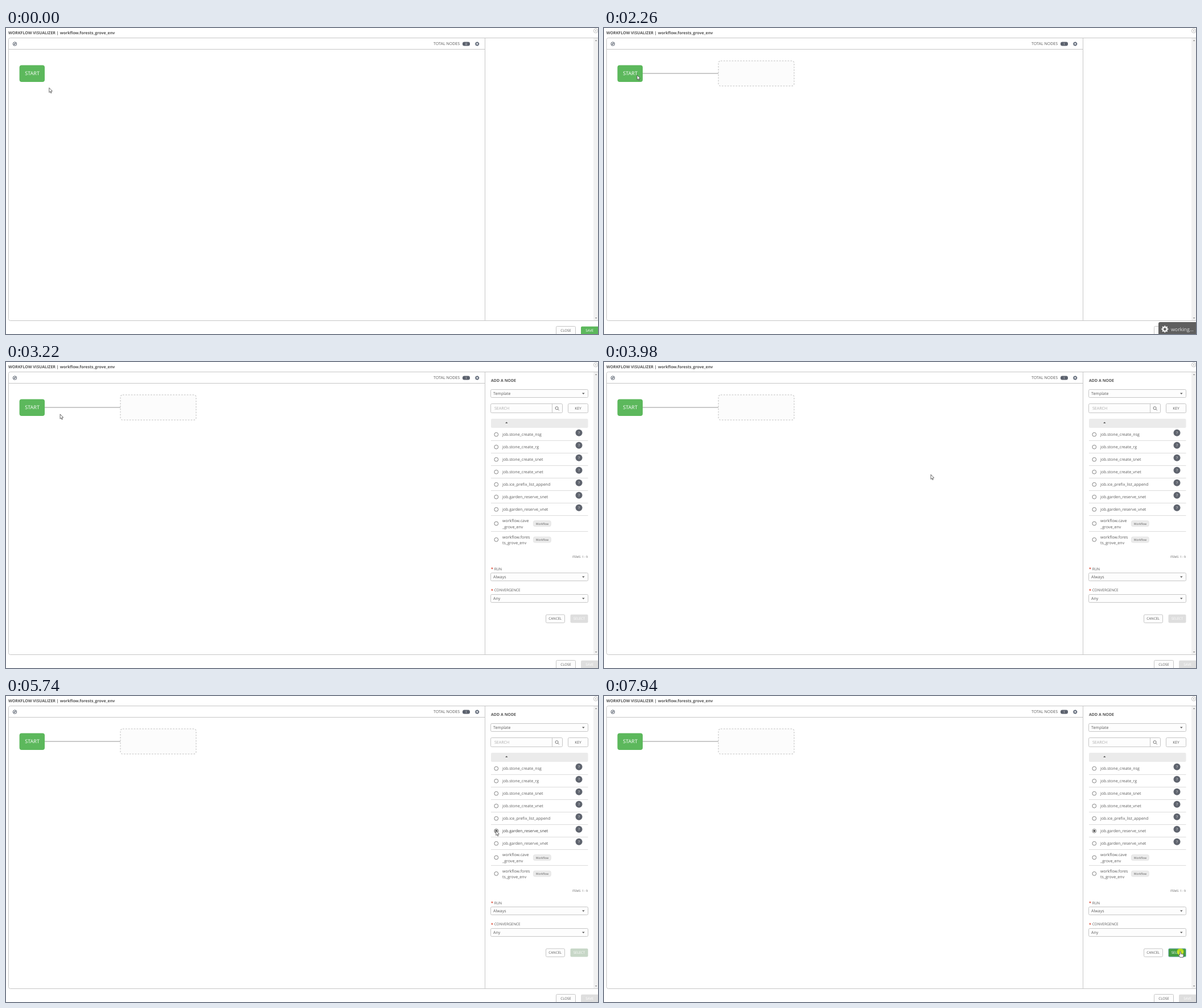
These frames come from a looping animation (1040x539 px, 8000 ms). An HTML page:

```html
<!DOCTYPE html>
<html lang="en">
<head>
<meta charset="utf-8">
<title>Workflow visualizer</title>
<style>
  html, body { margin: 0; width: 100%; height: 100%; overflow: hidden; background: #fff; }
  svg { display: block; width: 100%; height: 100%; }
  text { font-family: "Open Sans", "Noto Sans", sans-serif; font-size: 7.05px; fill: #5a5a5a; text-rendering: geometricPrecision; }
  .bold { font-weight: 700; font-size: 7px; fill: #555; }
  .btn { font-size: 6.1px; text-anchor: middle; }
  .label { font-size: 6.45px; }
  .star { fill: #d9432f; font-weight: 700; }
  .tiny { font-size: 5.1px; }
  .mid { text-anchor: middle; }
  .end { text-anchor: end; }
  .white { fill: #fff; }
  .box { fill: #fdfdfd; stroke: #c6c6c6; stroke-width: 1; }
  .line { fill: none; stroke: #c6c6c6; stroke-width: 1; }
  .row { stroke: #dcdcdc; stroke-width: 1; }
  .ring { fill: #fff; stroke: #757575; stroke-width: .9; }
  .caret { fill: #555; }
</style>
</head>
<body>
<svg id="stage" viewBox="0 0 1040 539" preserveAspectRatio="xMinYMin meet"></svg>
<script>
const LOOP = 8000;
const GREEN = [92, 184, 92], GREY = [222, 222, 222];

// ---- markup helpers ----
const text = (x, y, s, cls = '', attrs = '') => `<text x="${x}" y="${y}" class="${cls}" ${attrs}>${s}</text>`;
const rect = (x, y, w, h, rx, attrs) => `<rect x="${x}" y="${y}" width="${w}" height="${h}" rx="${rx}" ${attrs}/>`;
const box = (x, y, w, h) => rect(x, y, w, h, 2, 'class="box"');
const caret = (x, y, w, h) => `<path class="caret" d="M${x - w} ${y}h${2 * w}l${-w} ${h}z"/>`;
const dropdown = (y, s) => box(851.5, y, 171, 14) + text(856, y + 9.6, s) + caret(1014.3, y + 6, 2.3, 2.6);

function gear(r, fill) {
  const pts = [];
  for (let i = 0; i < 32; i++) {
    const a = (i - .5) * Math.PI / 16;
    const d = i % 4 < 2 ? r : r * .76;
    pts.push((d * Math.sin(a)).toFixed(2) + ' ' + (-d * Math.cos(a)).toFixed(2));
  }
  const h = r * .36;
  return `<path fill="${fill}" fill-rule="evenodd" d="M${pts.join('L')}ZM${-h} 0a${h} ${h} 0 1 0 ${2 * h} 0a${h} ${h} 0 1 0 ${-2 * h} 0z"/>`;
}

// ---- scene parts ----
function frame() {
  return text(4, 11.4, 'WORKFLOW VISUALIZER |', 'bold') +
    text(94.7, 11.4, 'workflow.forests_grove_env', 'bold') +
    `<g fill="none" stroke="#c6c6c6"><circle cx="1036" cy="5" r="3.7"/><path d="M1034.5 3.5l3 3m0-3l-3 3"/></g>` +
    rect(1032, 18, 8, 497, 0, 'fill="#f1f1f1"') +
    `<path fill="#8a8a8a" d="M1034.8 23h3.6l-1.8-2zM1034.8 510h3.6l-1.8 2z"/>` +
    `<path class="line" d="M1040 17.5H7.5a3 3 0 0 0-3 3V512.5a3 3 0 0 0 3 3H1040M4.5 37.5H841.5M841.5 17.5V515.5"/>` +
    `<g transform="translate(15.5 28)"><circle r="3.2" fill="none" stroke="#4f5866"/><path fill="#4f5866" d="M2-2L.8.8-2 2-.8-.8z"/></g>` +
    text(751, 30.3, 'TOTAL NODES') +
    rect(802, 24.6, 13, 6.8, 3, 'fill="#5c626e"') +
    text(808.5, 29.9, '0', 'tiny mid white', 'id="count"') +
    `<g transform="translate(827.7 28)">${gear(3.9, '#566070')}</g>`;
}

function graph() {
  return `<g id="node"><path d="M68 80H201" stroke="#b7b7b7" stroke-width="1.5"/>` +
    rect(201, 57.8, 133, 44.4, 4, 'fill="#fcfcfc" stroke="#cdcdcd" stroke-width="1.3" stroke-dasharray="2.7 2.2"') + '</g>' +
    rect(23.6, 65.4, 44.4, 29.5, 4, 'fill="#5cb85c"') +
    text(46.1, 83.3, 'START', 'mid white', 'style="font-size:9px"');
}

function form() {
  const jobs = ['stone_create_nsg', 'stone_create_rg', 'stone_create_snet', 'stone_create_vnet',
    'ice_prefix_list_append', 'garden_reserve_snet', 'garden_reserve_vnet'];
  const flows = [['workflow.cave', '_grove_env'], ['workflow.fores', 'ts_grove_env']];
  const ring = (y, id = '') => `<circle class="ring" cx="861.3" cy="${y}" r="3.4" ${id}/>`;
  const rule = y => `<path class="row" d="M852 ${y}H1022.5"/>`;

  let s = text(852, 35.4, 'ADD A NODE', 'bold') + dropdown(48.5, 'Template');
  s += box(851.5, 73.5, 126, 16) + `<path class="line" d="M959.5 73.5v16"/>` +
    text(858, 84.1, 'SEARCH', '', 'style="fill:#adadad"') +
    `<g fill="none" stroke="#666" stroke-width=".9"><circle cx="967.6" cy="81.2" r="2.5"/><path d="M969.5 83.1l2.2 2.2"/></g>` +
    box(987.5, 73.5, 35, 16) + text(1005, 83.9, 'KEY', 'btn', 'style="font-size:6.6px"');
  s += rect(852, 100, 170.5, 16, 2, 'fill="#ebebeb"') + caret(879.3, 108, 2.2, -2.4);

  jobs.forEach((job, i) => {
    const y = 127.7 + 22 * i, hot = i === 5;
    s += ring(y, hot ? 'id="radio"' : '') +
      text(872, (y + 2.4).toFixed(1), 'job.' + job, '', hot ? 'id="pick"' : '') +
      `<circle cx="1006.5" cy="${y - 3}" r="6" fill="#5f646e"/>` +
      text(1006.5, (y - .8).toFixed(1), '?', 'btn white') + rule(138.5 + 22 * i);
  });
  s += `<circle id="dot" cx="861.3" cy="237.7" r="1.9" fill="#4a4a4a"/>`;

  flows.forEach(([top, bottom], i) => {
    const y = 284.5 + 28.4 * i;
    s += ring(y) + text(872, y - 2.4, top) + text(872, y + 8, bottom) +
      rect(926.4, y - 5, 31, 10.2, 3, 'fill="#ebebeb" stroke="#dedede" stroke-width=".6"') +
      text(942, y + 2, 'Workflow', 'tiny mid');
  });
  s += rule(298.5) + text(1022, 345, 'ITEMS&#160; 1 - 9', 'tiny end');

  s += text(852, 367, '*', 'star') + text(857.7, 366.6, 'RUN', 'label') + dropdown(371.5, 'Always');
  s += text(852, 404.8, '*', 'star') + text(857.7, 404.4, 'CONVERGENCE', 'label') + dropdown(409.5, 'Any');
  s += box(948.5, 445, 33, 14.4) + text(964.7, 454.4, 'CANCEL', 'btn') +
    rect(991.5, 444.8, 31, 14.8, 2, 'id="select"') + text(1007, 454.4, 'SELECT', 'btn white');
  return `<g id="form">${s}</g>`;
}

function footer() {
  return box(966.5, 525.5, 34, 20) + text(983.5, 535, 'CLOSE', 'btn') +
    rect(1010, 525.8, 36, 20, 2, 'id="save"') + text(1025.2, 535, 'SAVE', 'btn white') +
    `<g id="working">${rect(974, 518, 75, 30, 3, 'fill="#5f5f5f"')}` +
    `<g transform="translate(985.3 530.4)"><g id="spin">${gear(6.2, '#ececec')}</g></g>` +
    text(996, 533.5, 'working...', '', 'style="font-size:8.8px;fill:#e2e2e2"') + '</g>';
}

function pointer() {
  return `<circle id="click" r="6" fill="#ff0" fill-opacity=".6"/>` +
    `<g id="cursor" stroke="#444" stroke-width=".8" stroke-linejoin="round" fill="#fff">` +
    `<path id="arrow" d="M.3.3V8.5L2.1 6.9 3.3 9.7 4.5 9.2 3.3 6.4 5.9 6.2Z"/>` +
    `<path id="hand" d="M-.9.3C-.9-.9.9-.9.9.3V3.6L4.6 4.3Q5.8 4.6 5.6 6L5 9.8H-.6L-3 6.2Q-3.2 4.8-1.8 5.2L-.9 6Z"/></g>`;
}

document.getElementById('stage').innerHTML = frame() + graph() + form() + footer() + pointer();

// ---- motion ----
const el = {};
document.querySelectorAll('[id]').forEach(n => el[n.id] = n);

// begin, end, steps, x, y, power (negative: speeding up)
const moves = [
  [250, 251, 1, 74.9, 105, 1],
  [410, 840, 10, 57.8, 82.8, 1.4],
  [2980, 3740, 17, 416, 168, -2.18],
  [3790, 4570, 18, 805, 241.8, 1.6],
  [4620, 5200, 11, 860.5, 237, 2.4],
  [6220, 7000, 17, 1007, 428, 1.2],
  [7050, 7540, 9, 1012.5, 450.5, 1.5]
];

function cursorAt(t) {
  let x = 75.5, y = 105;
  for (const [a, b, n, tx, ty, k] of moves) {
    if (t < a) break;
    const p = Math.min(n, Math.floor((t - a) / (b - a) * (n - 1) + 1e-6) + 1) / n;
    const e = k < 0 ? p ** -k : 1 - (1 - p) ** k;
    x += (tx - x) * e;
    y += (ty - y) * e;
  }
  return [x, y];
}

const ramp = (t, a, b) => Math.max(0, Math.min(1, (t - a) / (b - a)));
const within = (t, a, b) => t >= a && t < b;
const mix = (a, b, p) => `rgb(${a.map((v, i) => Math.round(v + (b[i] - v) * p))})`;
const show = (n, on) => n.setAttribute('visibility', on ? 'visible' : 'hidden');

function render(t) {
  const [x, y] = cursorAt(t);
  const over = x > 991 && y > 444;
  const onRow = within(t, 5150, 6220);

  show(el.node, t >= 1260);
  el.count.textContent = t >= 1670 ? '1' : '0';
  el.form.style.display = t >= 2310 ? '' : 'none';
  el.save.setAttribute('fill', mix(GREEN, GREY, ramp(t, 1640, 1800)));

  el.working.setAttribute('opacity', ramp(t, 1660, 1900) * (1 - ramp(t, 2270, 2500)));
  el.spin.setAttribute('transform', `rotate(${(t - 2260) * .18})`);

  el.dot.setAttribute('opacity', t >= 5740 ? 1 : 0);
  el.radio.style.stroke = onRow ? '#444' : '';
  el.pick.style.fill = onRow ? '#3c3c3c' : '';
  el.select.setAttribute('fill', over ? '#449d44' : mix(GREY, GREEN, ramp(t, 5700, 5930)));
  el.select.setAttribute('stroke', t >= 7940 ? '#a3c3e0' : 'none');

  const spot = `translate(${x.toFixed(2)} ${y.toFixed(2)})`;
  el.cursor.setAttribute('transform', spot);
  el.click.setAttribute('transform', spot);
  show(el.click, within(t, 1190, 1330) || within(t, 5390, 5500) || t >= 7940);
  show(el.arrow, !over);
  show(el.hand, over);
}

let began;
function tick(now) {
  began ??= now;
  render((now - began) % LOOP);
  requestAnimationFrame(tick);
}
render(0);
requestAnimationFrame(tick);
</script>
</body>
</html>
```
